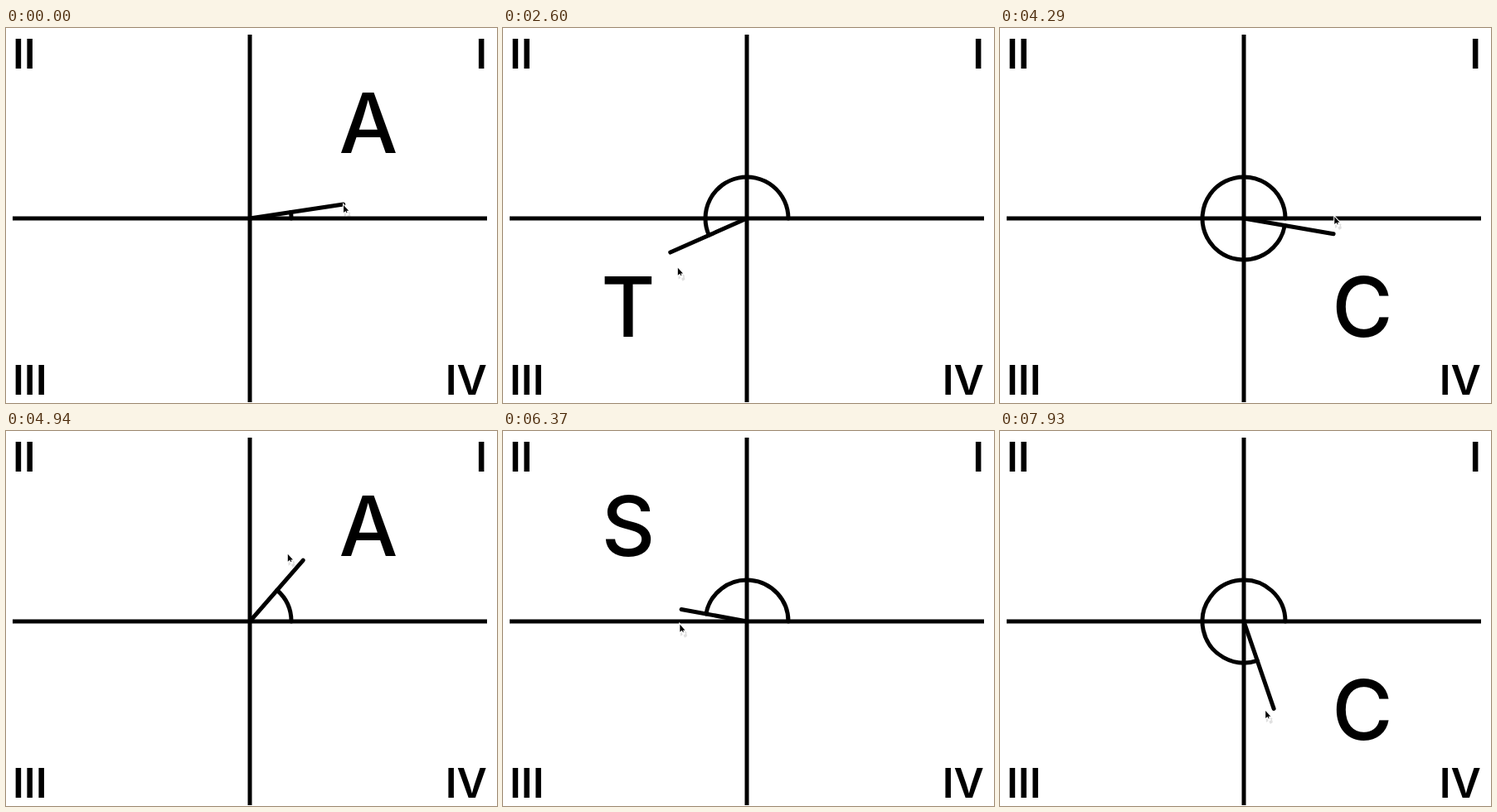
Recreate the animation shown at these times as an HTML page. Size 592 by 453 pixels, loop 8 s.

```html
<!DOCTYPE html>
<html lang="en">
<head>
<meta charset="utf-8">
<title>Quadrants</title>
<style>
html, body { margin: 0; width: 100%; height: 100%; overflow: hidden; background: #fff; }
svg { display: block; width: 592px; height: 453px; }
text { font: 600 50px Inter, "Liberation Sans", sans-serif; font-optical-sizing: none; }
.line { fill: none; stroke: #000; stroke-width: 5; }
.round { stroke-linecap: round; stroke-linejoin: round; }
.end { text-anchor: end; }
.sign { font-size: 100px; font-weight: 500; text-anchor: middle; visibility: hidden; }
.sign.on { visibility: visible; }
</style>
</head>
<body>
<svg viewBox="0 0 592 453">
  <path class="line" d="M8 230H580M294 8V452"/>
  <text x="8" y="49">II</text>
  <text class="end" x="580" y="49">I</text>
  <text x="8" y="443">III</text>
  <text class="end" x="580" y="443">IV</text>
  <text class="sign" x="437" y="151">A</text>
  <text class="sign" x="151" y="151">S</text>
  <text class="sign" x="151" y="373">T</text>
  <text class="sign" x="437" y="373">C</text>
  <path id="arc" class="line round"/>
  <path id="ray" class="line round"/>
  <g id="cursor">
    <path d="M1 3V15L4 13 6 17 9 15 8 11H9Z" opacity=".12"/>
    <path d="M0 0V11L2.5 9 4.5 13 6 12 4.5 8.5H7.5Z" fill="#fff" stroke="#fff" stroke-width="1.5"/>
    <path d="M.3 1V10L2.6 8 4 10.5 4.8 10 3.8 7.8H6.5Z"/>
  </g>
</svg>
<script>
const LOOP = 8000, STEP = 130;
const CX = 294, CY = 230, R = 50;

// Key poses of the pointer: time, angle in degrees, distance from the centre
const keys = [
  [130, 8.6, 114], [910, 73, 82], [1560, 115.7, 85], [2600, 204, 101], [4420, 361.6, 109],
  [5590, 468, 81], [6500, 542, 81], [7150, 627, 90], [7540, 660, 113], [8060, 643.6, 110]
];

// Starts from rest, then follows the neighbouring keys
function slope(i, k) {
  if (i === 0) return 0;
  const p = keys[i - 1], n = keys[i + 1] || keys[i];
  return (n[k] - p[k]) / (n[0] - p[0]);
}

function hermite(i, t, k) {
  const p = keys[i], n = keys[i + 1], d = n[0] - p[0];
  const u = (t - p[0]) / d, v = 1 - u;
  return v * v * (1 + 2 * u) * p[k] + u * u * (1 + 2 * v) * n[k]
    + d * u * v * (v * slope(i, k) - u * slope(i + 1, k));
}

function point(angle, r) {
  const a = angle * Math.PI / 180;
  return [CX + r * Math.cos(a), CY - r * Math.sin(a)];
}

function pose(time) {
  const t = Math.max(time, keys[0][0]);
  const i = keys.findIndex(k => k[0] > t);
  const from = (i < 0 ? keys.length : i) - 2 + (i < 0 ? 0 : 1);
  const angle = hermite(from, t, 1) % 360;
  return { angle, tip: point(angle, hermite(from, t, 2)) };
}

const [arc, ray, cursor] = ["arc", "ray", "cursor"].map(id => document.getElementById(id));
const signs = document.querySelectorAll(".sign");

function draw(now) {
  const t = Math.floor(now % LOOP / STEP) * STEP;
  const { angle, tip } = pose(t);
  ray.setAttribute("d", `M${CX} ${CY}L${tip}`);
  arc.setAttribute("d", `M${CX + R} ${CY}A${R} ${R} 0 ${+(angle > 180)} 0 ${point(angle, R)}`);
  // The pointer runs one step ahead of the ray
  cursor.setAttribute("transform", `translate(${pose(t + STEP).tip})`);
  signs.forEach((s, i) => s.classList.toggle("on", i === Math.floor(angle / 90)));
}

function tick() {
  draw(performance.now());
  requestAnimationFrame(tick);
}
tick();
</script>
</body>
</html>
```
